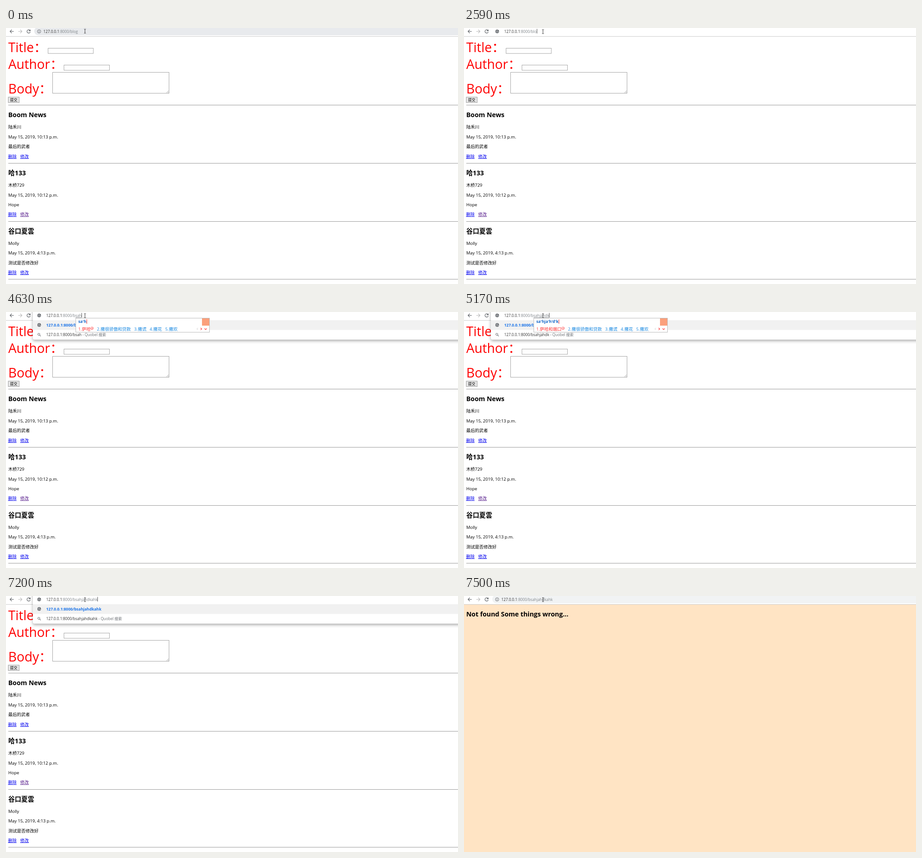
Write an HTML page that moves like this. It is 994x563 px and loops after 8000 ms.

```html
<!DOCTYPE html>
<html lang="zh-CN">
<head>
<meta charset="utf-8">
<style>
  html, body { margin: 0; width: 100%; height: 100%; overflow: hidden; background: #fff; }
  svg { display: block; }
  text { font-family: "Open Sans", "Noto Sans CJK SC", "Noto Sans CJK", sans-serif; white-space: pre; }
  .panel { filter: drop-shadow(0 3px 3px rgba(0, 0, 0, .32)); }
</style>
</head>
<body>
<svg id="stage" width="994" height="563" viewBox="0 0 994 563"></svg>
<script>
const LOOP = 8000, HOST = '127.0.0.1', PORT = ':8000/';
const URL_SIZE = 8.25, BOLD_SIZE = 8.45, ROW_STEP = 21.4;
const BLUE = '#1a73e8', GREY = '#80868b', DARK = '#333', ICON = '#5f6368';
const stage = document.getElementById('stage');
const pen = document.createElement('canvas').getContext('2d');

// Each step changes only the listed parts of the state.
const steps = [
  { at: 0, bar: 'hover', beam: 7, path: 'blog' },
  { at: 280, beam: 8 },
  { at: 1000, bar: 'focus' },
  { at: 1140, selected: true },
  { at: 1580, selected: false, caret: true },
  { at: 2130, caret: false },
  { at: 2590, typed: true, path: 'blo', caret: true },
  { at: 2710, rows: 5 },
  { at: 2990, path: 'bl' },
  { at: 3490, path: 'b' },
  { at: 4050, caret: false },
  { at: 4510, path: 'bsa', pinyin: 'sa', first: '撒', caret: true },
  { at: 4630, path: 'bsah', pinyin: "sa'h", first: '萨哈', rows: 2 },
  { at: 4900, path: 'bsahj', pinyin: "sa'hj", first: '萨哈和' },
  { at: 5020, path: 'bsahjah', pinyin: "sa'hja'h", first: '萨哈和' },
  { at: 5170, path: 'bsahjahdk', pinyin: "sa'hja'h'd'k", first: '萨哈和端口' },
  { at: 5290, path: 'bsahjahdka', pinyin: "sa'hja'h'd'ka", first: '萨哈和端口啊' },
  { at: 5420, path: 'bsahjahdkah', pinyin: "sa'hja'h'd'ka'h", first: '萨哈和端口啊哈' },
  { at: 5540, path: 'bsahjahdkahk', pinyin: "sa'hja'h'd'ka'h'k", first: '萨哈和端口啊哈看看' },
  { at: 5840, caret: false },
  { at: 6140, pinyin: '', caret: true },
  { at: 6700, caret: false },
  { at: 7200, caret: true },
  { at: 7350, bar: 'idle', typed: false, caret: false, missing: true, fade: 0.35 },
  { at: 7500, rows: 0 }
];

const posts = [
  ['Boom News', '陆禾川', 'May 15, 2019, 10:13 p.m.', '最后的武者'],
  ['哈133', '木桥729', 'May 15, 2019, 10:12 p.m.', 'Hope'],
  ['谷口夏雲', 'Molly', 'May 15, 2019, 4:13 p.m.', '测试是否修改好']
];

const text = (x, y, size, body, fill = '#000', extra = '') =>
  `<text x="${x}" y="${y}" font-size="${size}" fill="${fill}" ${extra}>${body}</text>`;
const span = (body, fill, extra = '') => `<tspan fill="${fill}" ${extra}>${body}</tspan>`;
const rect = (x, y, w, h, fill, extra = '') =>
  `<rect x="${x}" y="${y}" width="${w}" height="${h}" fill="${fill}" ${extra}/>`;
const line = (d, color, width = 1) =>
  `<path d="${d}" fill="none" stroke="${color}" stroke-width="${width}"/>`;
const bold = 'font-weight="700"';

function widthOf(body, size, weight = 400) {
  pen.font = `${weight} ${size}px "Open Sans", "Noto Sans CJK SC", sans-serif`;
  return pen.measureText(body).width;
}

function blogPage() {
  const field = (x, y, w, h) => rect(x + .5, y + .5, w, h, '#fff', 'stroke="#a6a6a6"');
  const rule = y => rect(5, y, 989, 1, '#999');
  let out = text(5, 53, 28.5, 'Title：', '#f00') + text(5, 90, 28.5, 'Author：', '#f00') +
    text(5, 144, 28.5, 'Body：', '#f00') +
    field(92, 44, 99.5, 11.5) + field(127, 81, 100, 11.5) + field(102, 97, 256, 46) +
    line('M353 142.5l4.5-4.5M356 142.5l1.5-1.5', '#888', .8) +
    rect(5, 152, 24, 12, '#e8e8e8', 'stroke="#999"') +
    text(9, 161.2, 8, '提交') + rule(169);
  posts.forEach(([title, author, date, body], i) => {
    const y = 127.7 * i;
    const link = (x, label, fill) =>
      text(x, y + 285.6, 9.4, label, fill, 'text-decoration="underline"');
    out += text(5, y + 196.4, 14.25, title, '#000', bold) +
      text(5, y + 221.4, 9.5, author) + text(5, y + 242.8, 9.5, date) +
      text(5, y + 264.4, 9.5, body) +
      link(4.5, '删除', '#00e') + link(31.3, '修改', i === 1 ? '#551a8b' : '#00e') +
      rule(Math.round(y + 297));
  });
  return out;
}

const missingPage = () => rect(0, 18, 994, 545, '#ffe4c4') +
  text(5, 44.7, 14.3, 'Not found Some things wrong...', '#000', bold);

const globe = y => `<circle cx="73" cy="${y}" r="3.9" fill="${ICON}"/>` +
  line(`M70.2 ${y - .6}l2.3 2v1.4M73.2 ${y - 2.8}v1.6h-1.6M73.6 ${y + .4}h1.7v1.5`, '#fff', .9);
const lens = y => `<circle cx="72.2" cy="${y - .8}" r="2.3" fill="none" stroke="${ICON}"/>` +
  line(`M74 ${y + 1}l2.4 2.4`, ICON, 1.1);
const info = () => `<circle cx="72.8" cy="7.5" r="3.7" fill="none" stroke="${ICON}" stroke-width=".9"/>` +
  line('M72.8 5.4v1M72.8 7v2.7', ICON);

function suggestions({ rows, path, fade = 1 }) {
  if (!rows) return '';
  const bottom = 18 + ROW_STEP * rows;
  const match = (extra = '') =>
    span(HOST + PORT + path, BLUE, `${bold} font-size="${BOLD_SIZE}" ${extra}`);
  const rest = 'blog'.slice(path.length);
  const titled = tail => span('Blogs to show - ', DARK) + match('x="152"') + span(tail, BLUE);
  const search = span(HOST + PORT + path, DARK) + span(' - Quobel 搜索', '#6b6f74');
  const list = rows === 5
    ? [match(), titled(rest), match() + span(rest + '/blog', BLUE), titled(rest + '/'), search]
    : [match(), search];
  const items = list.map((body, i) => {
    const y = 28.5 + ROW_STEP * i;
    return (i === rows - 1 ? lens(y) : globe(y)) + text(88.5, y + 3.2, URL_SIZE, body);
  });
  return `<g opacity="${fade}"><g class="panel">` +
    rect(59, -10, 960, bottom + 10, '#fff', 'rx="4"') + '</g>' +
    rect(59, 18, 935, ROW_STEP, '#f1f1f1') + items.join('') + '</g>';
}

function toolbar({ bar, typed, path, selected, caret, pinyin }) {
  const x = typed ? 88.5 : 82.3;
  const end = x + widthOf(HOST + PORT + path, URL_SIZE);
  let out = '';
  if (bar !== 'focus')
    out += rect(62, -2, 960, 18, bar === 'hover' ? '#e8eaed' : '#f1f3f4', 'rx="9"');
  out += line('M17 7.5H9M12.7 3.7L8.9 7.5l3.8 3.8', ICON, 1.2) +
    line('M27 7.5h8M31.3 3.7l3.8 3.8-3.8 3.8', '#bbb', 1.2) +
    line('M52.6 5A3.7 3.7 0 1 0 53.4 8.6', ICON, 1.2) +
    `<path d="M53.8 3v3.9h-3.9z" fill="${ICON}"/>` +
    (typed ? globe(7.5) : info());
  if (selected) out += rect(x, 2, end - x, 11, '#0078d7');
  out += text(x, 10.5, URL_SIZE,
    span(HOST, selected ? '#fff' : DARK) + span(PORT + path, selected ? '#fff' : GREY));
  if (pinyin) out += rect(153, 12, end - 153, .7, GREY);
  if (caret) out += rect(Math.round(end), 2, 1, 10, '#555');
  return out;
}

function inputWindow({ pinyin, first }) {
  if (!pinyin) return '';
  let x = 159, words = '';
  [first, '撒很骄傲和贷款', '撒谎', '撒花', '撒欢'].forEach((word, i) => {
    const fill = i ? '#1687e0' : '#f33';
    words += text(x, 40.6, 9, i + 1 + '.', fill) + text(x + 8, 40.6, 9.5, word, fill);
    x += 15 + 9.55 * word.length;
    if (!i) {
      words += `<circle cx="${x - 4}" cy="35.8" r="2.8" fill="none" stroke="#f33" stroke-width=".8"/>` +
        line(`M${x - 5.4} 35.8l1.3 1.3 2.6-2.8`, '#f33', .8);
      x += 7;
    }
  });
  const right = Math.max(448, Math.round(x + 32));
  const end = 159 + widthOf(pinyin, 8.8, 700);
  return rect(153.5, 13.5, right - 154, 31, '#fff', 'stroke="#bbb"') +
    text(159, 24.4, 8.8, pinyin, '#1467c8', bold) + rect(end + .5, 16, 1, 10, '#f33') + words +
    line(`M${right - 26} 35l-2.3 2.3 2.3 2.3`, '#ccc') +
    line(`M${right - 20} 35l2.3 2.3-2.3 2.3`, '#f33', 1.2) +
    line(`M${right - 11.5} 36.3l2.5 2.3 2.5-2.3`, '#f33', 1.2) +
    rect(right - 17, 14, 16, 16, '#fba07c');
}

const pointer = y =>
  line(`M171.8 ${y - 4.5}h1.2l.7.6.7-.6h1.2M173.7 ${y - 4}v8M171.8 ${y + 4.5}h1.2l.7-.6.7.6h1.2`, '#222', .9);

function render(state) {
  stage.innerHTML = (state.missing ? missingPage() : blogPage()) +
    rect(0, 0, 994, 18, '#fff') + rect(0, 18, 994, 1, '#ccc') +
    suggestions(state) + toolbar(state) + inputWindow(state) + pointer(state.beam);
}

const start = performance.now();
let shown = 0;

function tick() {
  const time = (performance.now() - start) % LOOP;
  const count = steps.filter(step => step.at <= time).length;
  if (count !== shown) {
    shown = count;
    render(Object.assign({}, ...steps.slice(0, count)));
  }
  requestAnimationFrame(tick);
}
tick();
</script>
</body>
</html>
```
